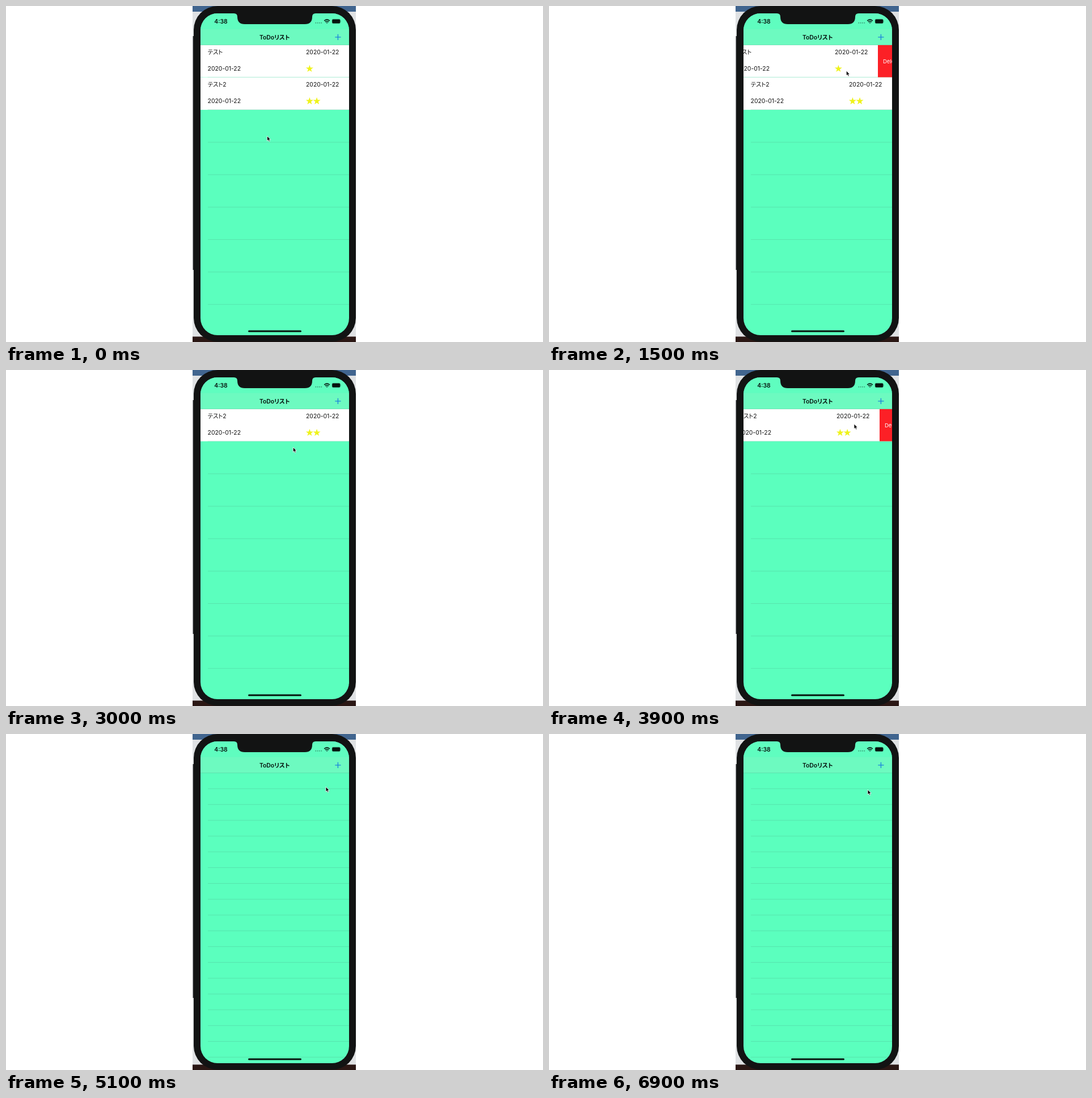
An HTML page for the animation above (7200 ms loop, 947 by 592 pixels).

```html
<!DOCTYPE html>
<html lang="ja">
<head>
<meta charset="utf-8">
<title>ToDoリスト</title>
<style>
  html, body { margin: 0; width: 100%; height: 100%; overflow: hidden; background: #fff; }
  svg { display: block; }
  text { font: 10.4px Inter, "Noto Sans CJK JP", "Noto Sans CJK", sans-serif; font-feature-settings: "palt"; fill: #111; }
  .bold { font-weight: 600; fill: #06130e; }
  .delete { font-size: 9.5px; fill: #fff; }
  .star { fill: #eff31b; }
  .line { fill: none; stroke: #3c3c43; stroke-opacity: .2; stroke-width: .7; }
</style>
</head>
<body>
<svg width="947" height="592" viewBox="0 0 947 592">
  <defs>
    <clipPath id="screen"><rect x="343" y="13" width="262" height="567" rx="30"/></clipPath>
    <clipPath id="capture"><rect x="329" width="288" height="592"/></clipPath>
    <path id="star" class="star" d="M0-6.8 1.6-2.1 6.5-2.1 2.6.9 4 5.6 0 2.8-4 5.6-2.6.9-6.5-2.1-1.6-2.1Z"/>
  </defs>
  <g clip-path="url(#capture)">
    <rect x="329" width="288" height="592" fill="#dfe1e3"/>
    <rect x="329" width="288" height="10" fill="#41658f"/>
    <rect x="329" y="582.5" width="288" height="10" fill="#2b1714"/>
    <rect x="329.6" y="53" width="4" height="412" fill="#25272a"/>
    <rect x="331" y="0" width="286" height="591.5" rx="42" fill="#121313"/>

    <g clip-path="url(#screen)">
      <rect x="343" y="13" width="262" height="567" fill="#5bffbe"/>
      <path id="fillers" class="line"/>
      <g id="rows"></g>
      <rect x="343" y="13" width="262" height="28" fill="#5ffdbf"/>
      <rect x="343" y="40.5" width="262" height="28" fill="#6dfac0"/>
      <path class="line" d="M343 68.6H605"/>
    </g>
    <path d="M402 12V13Q408 13 408 19Q408 32 421 32H527Q540 32 540 19Q540 13 546 13V12Z" fill="#121313"/>

    <text class="bold" x="379" y="31.2" text-anchor="middle">4:38</text>
    <g fill="#3d9f79">
      <circle cx="546.3" cy="29.8" r="1"/><circle cx="549.6" cy="29.8" r="1"/>
      <circle cx="552.9" cy="29.8" r="1"/><circle cx="556.2" cy="29.8" r="1"/>
    </g>
    <g fill="none" stroke="#06130e" stroke-width="1.6">
      <path d="M561.2 26.1Q566 21.6 570.8 26.1M563 28.1Q566 25.4 569 28.1"/>
      <path d="M564.6 29.3Q566 28.2 567.4 29.3L566 30.8Z" fill="#06130e" stroke="none"/>
    </g>
    <rect x="575" y="23.2" width="14.4" height="7.6" rx="2" fill="#06130e" stroke="#3d9f79" stroke-width=".5"/>
    <path d="M590.3 25.5Q591.8 27 590.3 28.5Z" fill="#3d9f79"/>
    <text class="bold" x="473.7" y="58.5" text-anchor="middle">ToDoリスト</text>
    <path d="M580.3 54.8H590.5M585.4 49.7V59.9" stroke="#1a80dc" stroke-width="1.3"/>
    <rect x="427" y="571.4" width="94" height="3.2" rx="1.6" fill="#06130e"/>

    <path id="cursor" d="M0 0V8.8L2 6.9 3.4 10.1 5 9.4 3.6 6.4H6.2Z" fill="#000" stroke="#fff" stroke-width=".8"/>
  </g>
</svg>
<script>
const STEP = 300, STEPS = 24;
const TOP = 68.6, ROW = 57.15, EMPTY_ROW = 27.82, WIDTH = 262;
const $ = id => document.getElementById(id);

// Tracks are [step, ...values], linear between entries.
const cursorTrack = [
  [0, 460.5, 229], [2, 505, 170], [4, 549, 115], [5, 524.3, 114], [6, 420, 113], [7, 328.5, 112],
  [8, 385, 124], [10, 506.3, 136], [12, 560, 98], [13, 538, 95], [14, 513, 93],
  [15, 562.5, 92], [16, 564, 93], [18, 564, 93], [23, 562, 98]
];
const swipeTracks = [
  [[4, 0], [5, -25], [6, -129], [7, -251]],
  [[12, 0], [13, -22], [14, -47], [15, -47], [16, -251]]
];
const heightTracks = [
  [[6, ROW], [7, 24.6], [8, 0]],
  [[15, ROW], [16, 24.6], [17, 0]]
];

function sample(track, step) {
  const next = track.findIndex(key => key[0] >= step);
  if (next < 0) return track[track.length - 1].slice(1);
  if (next === 0) return track[0].slice(1);
  const a = track[next - 1], b = track[next];
  const k = (step - a[0]) / (b[0] - a[0]);
  return a.slice(1).map((v, i) => v + (b[i + 1] - v) * k);
}

function rowMarkup(title, stars) {
  const starMarks = Array.from({ length: stars }, (_, i) =>
    `<use href="#star" x="${192.4 + 12.7 * i}" y="41.9"/>`).join("");
  return `<svg x="343" width="${WIDTH}" height="${ROW}">
    <rect width="${WIDTH}" height="${ROW}" fill="#fff"/>
    <g>
      <text x="12.6" y="16.7">${title}</text>
      <text x="12.6" y="45.3">2020-01-22</text>
      <text x="186" y="16.7">2020-01-22</text>
      ${starMarks}
      <path class="line" d="M12.6 ${ROW - .35}H${WIDTH}"/>
      <rect x="${WIDTH}" width="${WIDTH}" height="${ROW}" fill="#fc2026"/>
      <text class="delete" x="${WIDTH + 9}" y="32">Delete</text>
    </g>
  </svg>`;
}

$("rows").innerHTML = rowMarkup("テスト", 1) + rowMarkup("テスト2", 2);
const rows = [...$("rows").children];

function draw(step) {
  let y = TOP;
  rows.forEach((row, i) => {
    const [height] = sample(heightTracks[i], step);
    const [shift] = sample(swipeTracks[i], step);
    row.setAttribute("y", y);
    row.setAttribute("height", height);
    row.style.display = height ? "" : "none";
    row.querySelector("g").setAttribute("transform", `translate(${shift})`);
    y += height;
  });

  const gap = y > TOP ? ROW : EMPTY_ROW;
  let lines = "";
  for (let ly = y + gap; ly < 580; ly += gap) lines += `M356 ${ly}H605`;
  $("fillers").setAttribute("d", lines);

  const [cx, cy] = sample(cursorTrack, step);
  $("cursor").setAttribute("transform", `translate(${cx} ${cy})`);
}

const start = performance.now();
function tick() {
  draw(Math.floor((performance.now() - start) / STEP) % STEPS);
  requestAnimationFrame(tick);
}
tick();
</script>
</body>
</html>
```
